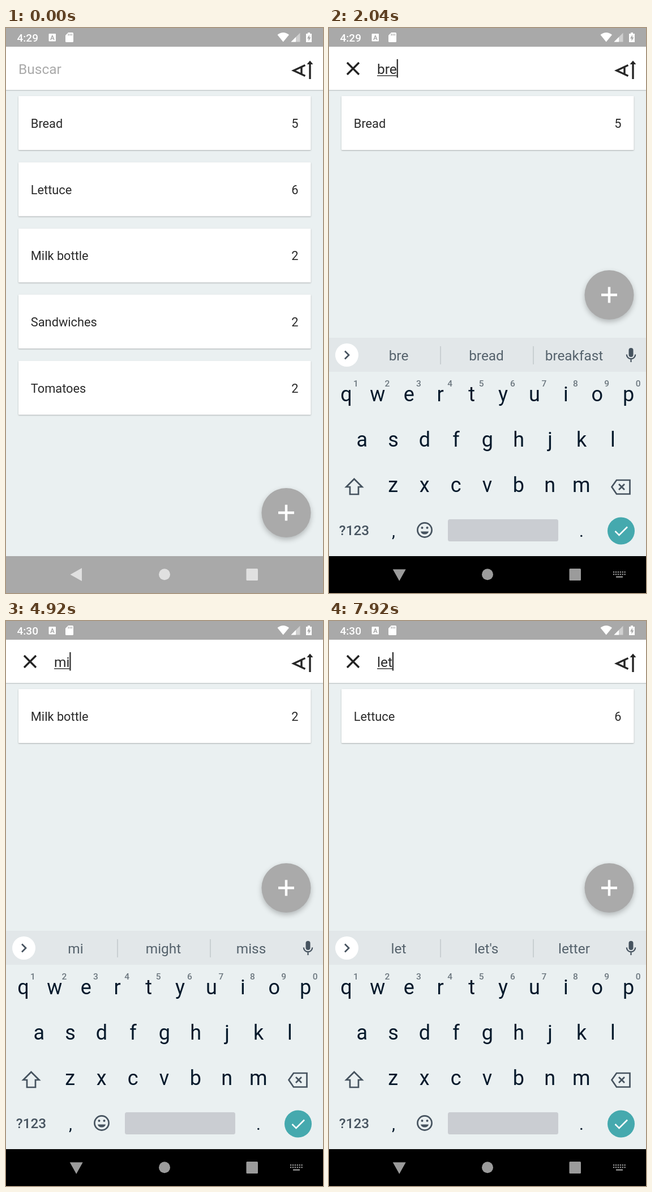
Write an HTML page that moves like this. It is 560x996 px and loops after 8000 ms.

```html
<!DOCTYPE html>
<html lang="en">
<head>
<meta charset="utf-8">
<title>Shopping list search</title>
<style>
html, body { margin: 0; width: 100%; height: 100%; overflow: hidden; background: #eaf0f1; }
svg { display: block; width: 100vw; height: 100vh; font-family: Roboto, "Noto Sans", sans-serif; }
.line { fill: none; stroke: #46535f; stroke-width: 2.7; }
.mid { text-anchor: middle; }
.key { font-size: 36px; fill: #06192b; }
.hint { font-size: 15.5px; font-weight: 500; fill: #6c777f; }
.word { font-size: 24.4px; fill: #55626c; }
.item { font-size: 21.8px; fill: #2a2a2a; }
.field { font-size: 24.5px; }
.card { filter: drop-shadow(0 1px 1.2px rgba(0,0,0,.27)); }
.fab { filter: drop-shadow(0 4px 5px rgba(0,0,0,.24)); }
</style>
</head>
<body>
<svg id="stage" viewBox="0 0 560 996">
  <rect width="560" height="996" fill="#eaf0f1"/>
  <g id="list"></g>

  <rect y="108" width="560" height="3" fill="#cfd4d5"/>
  <rect y="33" width="560" height="76" fill="#fff"/>
  <path id="clear" d="M32 61L53 82M53 61L32 82" stroke="#222" stroke-width="3.3"/>
  <text id="hint" class="field" y="81" fill="#aaa">Buscar</text>
  <text id="typed" class="field" x="85" y="81" fill="#2a2a2a"></text>
  <rect id="under" x="85" y="83.4" height="1.4" fill="#2a2a2a"/>
  <rect id="cursor" y="55" width="2.3" height="32.5" fill="#333"/>
  <g fill="none" stroke="#262626" stroke-width="3.4">
    <path d="M528.5 65.5L508 75L528.5 84.5M522 68.5V81.5"/>
    <path d="M537 90V61"/>
    <path d="M531.5 64L537 57.5L542.5 64Z" fill="#262626" stroke="none"/>
  </g>

  <g id="fab">
    <circle class="fab" cx="495" cy="0" r="43.5" fill="#aaa"/>
    <path d="M481 0H509M495 -14V14" stroke="#fff" stroke-width="4.4"/>
  </g>

  <g id="board">
    <rect y="546" width="560" height="386" fill="#eaf0f1"/>
    <rect y="546" width="560" height="60" fill="#e2e7e9"/>
    <circle cx="31.5" cy="576.5" r="20.5" fill="#fff"/>
    <path class="line" d="M28 569.5L35 576.5L28 583.5"/>
    <path d="M197 561V593M361 561V593" stroke="#bcc3c6" stroke-width="1.3"/>
    <g id="words"></g>
    <g id="loaf">
      <path d="M266 576Q264 570 270 569L284 568Q292 569 291 575L290 585L275 591L267 587Z" fill="#c98145"/>
      <path d="M266 576Q265 571 271 572Q278 573 277 579L275 591L267 587Z" fill="#f0cf9b"/>
      <path d="M270 570L284 568Q291 569 291 574L278 577Q277 572 270 570Z" fill="#dd9a5c"/>
    </g>
    <rect x="529.5" y="564" width="8" height="16" rx="4" fill="#46535f"/>
    <path class="line" d="M525.8 575.5A7.7 7.7 0 0 0 541.2 575.5M533.5 583V589" style="stroke-width:2.2"/>
    <g id="keys"></g>
    <path class="line" d="M44.5 795L58.5 809H52V822H37V809H30.5Z"/>
    <path class="line" d="M499.5 809L508 797H531.5V821.5H508ZM512 804L522 814M522 804L512 814"/>
    <text class="mid" x="44.5" y="894" font-size="24.3" font-weight="500" fill="#46535f">?123</text>
    <circle class="line" cx="169" cy="885" r="12.6"/>
    <circle cx="164.5" cy="881" r="2" fill="#46535f"/>
    <circle cx="173.5" cy="881" r="2" fill="#46535f"/>
    <path d="M162 887.5H176A7.2 6.5 0 0 1 162 887.5Z" fill="#46535f"/>
    <rect x="210" y="866" width="195" height="39" rx="3.5" fill="#cacdd2"/>
    <circle cx="516" cy="886.5" r="24" fill="#45a9ae"/>
    <path d="M505.5 887L512.5 894L527 879.5" fill="none" stroke="#fff" stroke-width="2.6"/>
  </g>

  <rect id="nav" y="931" width="560" height="65"/>
  <g id="navIcons">
    <path id="back" d="M113.5 963.5L134 952V975Z"/>
    <circle cx="280" cy="963.3" r="10"/>
    <rect x="424.5" y="953" width="20.5" height="21" rx="1.5"/>
    <g id="switch"></g>
  </g>

  <rect width="560" height="33" fill="#a9a9a9"/>
  <g fill="#fff">
    <text id="clock" x="19.5" y="24" font-size="19" font-weight="500"></text>
    <rect x="75.5" y="10" width="12.5" height="13.5" rx="1"/>
    <text class="mid" x="81.8" y="21" font-size="11.5" font-weight="700" style="fill:#a9a9a9">A</text>
    <path d="M110 8H117.5Q119 8 119 9.5V23.5Q119 25 117.5 25H106.500Q105 25 105 23.5V13Z"/>
    <path d="M110.200 10V13.500M113.200 10V13.500M116.200 10V13.500" stroke="#a9a9a9" stroke-width="1.3"/>
    <path d="M479.500 12Q489.700 4 500 12L489.700 24.500Z"/>
    <path d="M519.500 8.500V24.500H503.500Z" opacity=".45"/>
    <path d="M512 16V24.500H503.500Z"/>
    <path d="M533 8H537V10H540V25H530V10H533Z"/>
    <path d="M536 12L532 18.500H534.500V23L538.500 16.500H536Z" fill="#a9a9a9"/>
  </g>
</svg>
<script>
const LOOP = 8000;
const $ = id => document.getElementById(id);
const clamp = v => Math.max(0, Math.min(1, v));
const easeOut = v => 1 - Math.pow(1 - clamp(v), 3);
const mix = (a, b, p) => a + (b - a) * p;
const gray = v => { const n = Math.round(v); return `rgb(${n},${n},${n})`; };

function add(parent, tag, attrs, text = '') {
  const el = document.createElementNS('http://www.w3.org/2000/svg', tag);
  for (const k in attrs) el.setAttribute(k, attrs[k]);
  el.textContent = text;
  parent.appendChild(el);
  return el;
}
const show = (el, on) => el.setAttribute('visibility', on ? 'visible' : 'hidden');

// Each track holds [start time, value] pairs.
const typedTrack = [[0, ''], [1840, 'b'], [1960, 'br'], [2040, 'bre'], [2200, 'brea'], [2440, 'bread'],
  [3200, 'brea'], [3440, 'bre'], [3480, 'br'], [3560, 'b'], [3600, ''],
  [4520, 'm'], [4760, 'mi'], [4960, 'mil'], [5440, 'mi'], [5800, 'm'], [5880, ''],
  [7200, 'l'], [7360, 'le'], [7920, 'let']];
const queryTrack = [[0, ''], [1920, 'b'], [2040, 'br'], [3600, 'b'], [3640, ''],
  [4760, 'm'], [4920, 'mi'], [5920, 'm'], [6000, ''], [7200, 'l'], [7920, 'let']];
const idle = 'thanks I we', forB = 'b be but', forM = 'm my maybe';
const wordTrack = [[0, idle], [1880, forB], [2040, 'bre bread breakfast'], [2200, 'brea bread Brad'],
  [2520, 'bread * Brad'], [3520, 'brea bread Brad'], [3680, forB], [4120, idle],
  [4520, forM], [4920, 'mi might miss'], [4960, 'mil milk million'], [5840, 'mi might miss'],
  [6120, forM], [6560, idle], [7200, 'l let look'], [7360, 'le let lets'], [7440, "let let's letter"]];
const cursorTrack = [[0, 0], [280, 1], [1240, 0], [1720, 1], [3000, 0], [3200, 1], [7000, 0], [7040, 1]];
const at = (track, t) => track.filter(s => s[0] <= t).pop()[1];

const goods = [['Bread', 5], ['Lettuce', 6], ['Milk bottle', 2], ['Sandwiches', 2], ['Tomatoes', 2]];
const cards = goods.map(([name, count]) => {
  const g = add($('list'), 'g', {});
  add(g, 'rect', { class: 'card', x: 22, y: 120, width: 516.5, height: 95, rx: 1, fill: '#fff' });
  add(g, 'text', { class: 'item', x: 43.8, y: 176 }, name);
  add(g, 'text', { class: 'item', x: 516.5, y: 176, 'text-anchor': 'end' }, count);
  return g;
});

const words = [123, 278, 433].map(x => add($('words'), 'text', { class: 'word mid', x, y: 586 }));

const pitch = 55.4;
[['qwertyuiop', 30.5, 658], ['asdfghjkl', 58.2, 738], ['zxcvbnm', 113.3, 818]].forEach(([row, x, y]) =>
  [...row].forEach((c, i) => add($('keys'), 'text', { class: 'key mid', x: x + i * pitch, y }, c)));
[...'1234567890'].forEach((c, i) =>
  add($('keys'), 'text', { class: 'hint mid', x: 47.5 + i * pitch, y: 631.5 }, c));
add($('keys'), 'text', { class: 'key mid', x: 114, y: 897, style: 'font-size:30px' }, ',');
add($('keys'), 'text', { class: 'key mid', x: 446, y: 897, style: 'font-size:30px' }, '.');

for (let r = 0; r < 2; r++)
  for (let c = 0; c < 6; c++)
    add($('switch'), 'rect', { x: 502 + c * 3.9, y: 958 + r * 4, width: 2.2, height: 2.2 });
add($('switch'), 'rect', { x: 507, y: 966.5, width: 12, height: 2.2 });

function draw(t) {
  const focus = easeOut((t - 280) / 280);
  const rise = easeOut((t - 560) / 400);
  const typed = at(typedTrack, t), query = at(queryTrack, t);

  let row = 0;
  goods.forEach(([name], i) => {
    const hit = name.toLowerCase().includes(query);
    show(cards[i], hit);
    if (hit) cards[i].setAttribute('transform', `translate(0 ${row++ * 116.7})`);
  });

  $('clear').setAttribute('opacity', focus);
  $('hint').setAttribute('x', mix(22, 85, focus));
  show($('hint'), !typed);
  $('typed').textContent = typed;
  const width = typed ? $('typed').getComputedTextLength() : 0;
  $('under').setAttribute('width', width);
  $('cursor').setAttribute('x', mix(22, 84.8, focus) + width);
  show($('cursor'), at(cursorTrack, t));

  $('fab').setAttribute('transform', `translate(0 ${mix(854.5, 470.5, rise)})`);
  $('board').setAttribute('transform', `translate(0 ${mix(386, 0, rise)})`);
  show($('board'), rise > 0);
  const choice = at(wordTrack, t).split(' ');
  words.forEach((w, i) => { w.textContent = choice[i] === '*' ? '' : choice[i]; });
  $('loaf').setAttribute('opacity', choice[1] === '*' ? 1 : 0);

  $('nav').setAttribute('fill', gray(mix(169, 0, rise)));
  $('navIcons').setAttribute('fill', gray(mix(224, 155, rise)));
  $('back').setAttribute('transform', `rotate(${-90 * rise} 124.5 963.8)`);
  $('switch').setAttribute('opacity', rise);
  $('clock').textContent = t < 2720 ? '4:29' : '4:30';
}

function tick() {
  draw(performance.now() % LOOP);
  requestAnimationFrame(tick);
}
tick();
</script>
</body>
</html>
```
